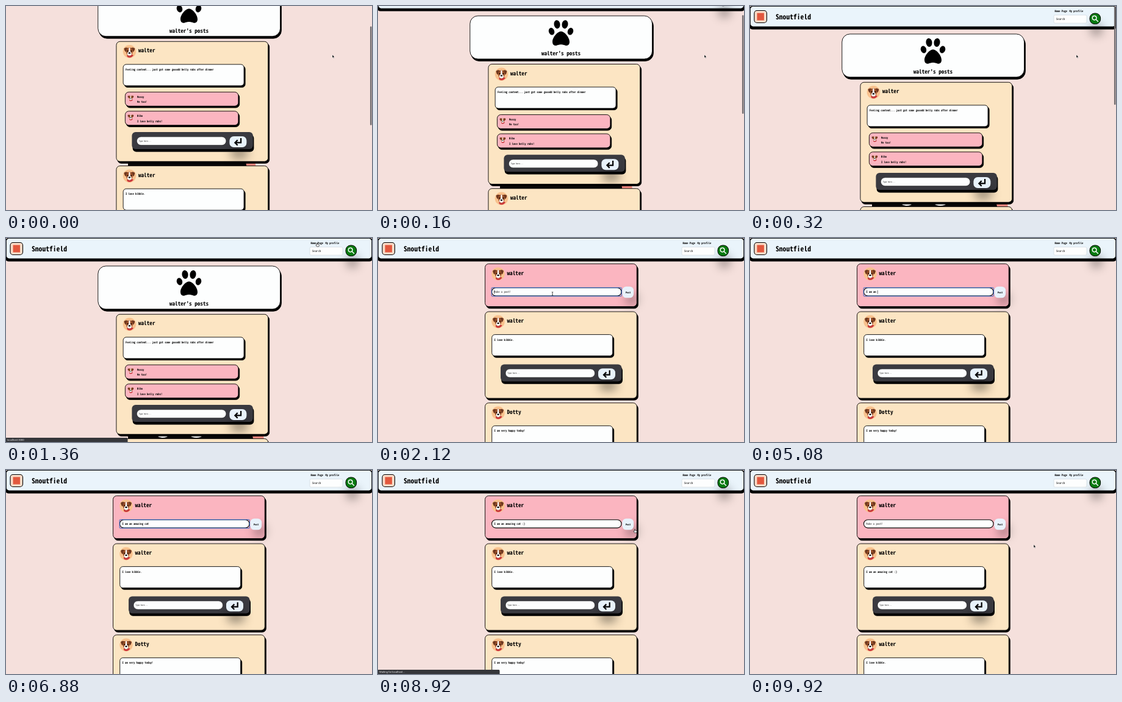
An HTML page for the animation above (10 s loop, 600 by 335 pixels).

```html
<!DOCTYPE html>
<html lang="en">
<head>
<meta charset="utf-8">
<style>
  html, body { margin: 0; width: 100%; height: 100%; overflow: hidden; background: #f5e0dc; }
  svg { display: block; width: 600px; height: 335px; }
  text {
    font: 700 4.6px "Noto Sans Mono CJK JP", "Noto Sans Mono", monospace;
    font-size-adjust: ch-width 0.5;
    text-rendering: geometricPrecision;
    white-space: pre;
  }
  #status text { font: 4.2px Roboto, sans-serif; font-size-adjust: none; }
  .soft { filter: drop-shadow(6px 11px 8px #0005); }
  .glow { filter: drop-shadow(2px 18px 8px #0006); }
</style>
</head>
<body>
<svg id="stage" viewBox="0 0 600 335"></svg>
<script>
const PINK = '#fbb5c0', CREAM = '#fce5c3', ICE = '#e8f2fb', WHITE = '#fdfefe', HINT = '#666';
const USER = 'walter', MESSAGE = 'I am an amazing cat :)';

const rect = (x, y, w, h, r, fill, extra = '') =>
  `<rect x="${x}" y="${y}" width="${w}" height="${h}" rx="${r}" fill="${fill}" ${extra}/>`;
const text = (x, y, str, size = 4.6, fill = '#000', extra = '') =>
  `<text x="${x}" y="${y}" fill="${fill}" style="font-size:${size}px" ${extra}>${str}</text>`;
const group = (x, y, body) => `<g transform="translate(${x} ${y})">${body}</g>`;
const outline = (w = .9) => `stroke="#000" stroke-width="${w}"`;

// Outlined box with a hard black shadow
const box = (x, y, w, h, r, fill, dx = 2, dy = 3) =>
  rect(x + dx, y + dy, w, h, r, '#000', outline()) + rect(x, y, w, h, r, fill, outline());

const dog = `
  <path d="M-4 5Q0 10 4 5L6.5 6Q4 10 0 10Q-3 10-4 8Z" fill="#c9303a"/>
  <path d="M-2-5.5Q-6-8-9-5Q-8.5-1-6 1L-4.5-1ZM2-5.5Q6-8 9-5Q8.5-1 6 1L4.5-1Z" fill="#6e371f"/>
  <path d="M0-6.5Q5-6.5 5.5-1Q5.5 3 3 6Q0 8.5-3 6Q-5.5 3-5.5-1Q-5-6.5 0-6.5Z" fill="#9a5029"/>
  <path d="M-1-6.3H1L1.3 0Q4 2 3.4 5Q0 8.5-3.4 5Q-4 2-1.3 0Z" fill="#fff"/>
  <circle cx="-2.9" cy="-.8" r=".9"/><circle cx="2.9" cy="-.8" r=".9"/>
  <ellipse cy="2.4" rx="1.7" ry="1.2"/>`;
const avatar = (x, y) => group(x, y, `<circle r="10.7" fill="#f8c18d"/>${dog}`);

const heading = name => avatar(21.5, 16.5) + text(36, 18.2, name, 9.2);

const commentForm = y => group(25.5, y,
  rect(1.2, 4, 198.8, 28.3, 6, '#000') +
  rect(0, 0, 198.5, 28, 6, '#3a3a40') +
  rect(8, 7.7, 146.5, 13.8, 7, WHITE, 'stroke="#111" stroke-width=".5"') +
  text(11.3, 15.8, 'Type here...', 3.4, HINT) +
  rect(160, 6.9, 28, 18, 7, ICE, 'class="glow"') +
  '<path d="M178.7 9.8V17.3H169.5M173.3 13L169 17.3L173.3 21.6" fill="none" stroke="#000" stroke-width="2.2"/>');

const comment = (y, name, line) =>
  box(14.5, y, 185.5, 23, 6, PINK, 1.8, 2.7) +
  group(23.5, y + 9.5, `<g transform="scale(.55)">${dog}</g>`) +
  text(34, y + 9.4, name) + text(34, y + 17.9, line);

function post(x, y, name, line, comments = []) {
  return group(x, y,
    box(0, 0, 248.8, comments.length ? 197 : 142.2, 6, CREAM) +
    heading(name) +
    box(11.2, 37.6, 198, 35, 5, WHITE, 2, 2.6) +
    text(15, 47.7, line) +
    comments.map((c, i) => comment(83 + i * 31.4, ...c)).join('') +
    commentForm(86.4 + comments.length * 31.2));
}

const paw = `
  <ellipse cx="-15.5" cy="-3" rx="4.6" ry="6" transform="rotate(-18 -15.5 -3)"/>
  <ellipse cx="-6.5" cy="-14.5" rx="5" ry="7" transform="rotate(-8 -6.5 -14.5)"/>
  <ellipse cx="6.5" cy="-14.5" rx="5" ry="7" transform="rotate(8 6.5 -14.5)"/>
  <ellipse cx="15.5" cy="-3" rx="4.6" ry="6" transform="rotate(18 15.5 -3)"/>
  <path d="M0-3C6-3 14 7 14 14C14 19 11 21 7 20C2 18-2 18-7 20C-11 21-14 19-14 14C-14 7-6-3 0-3Z"/>`;

const header =
  rect(-2, 0, 604, 38.4, 6, '#000') +
  rect(.4, .4, 599.2, 33.6, 5, '#eaf4fb', outline()) +
  rect(7, 7.5, 20.5, 20, 4.5, '#fbdcc8', outline(1.1)) +
  rect(11.5, 11.5, 11.5, 12, 0, '#e2583e') +
  text(42, 22, 'Snoutfield', 11.6) +
  text(499.5, 9.6, 'Home Page', 4.55) + text(523.5, 9.6, 'My profile', 4.55) +
  rect(498, 14.9, 54, 13.3, 2, WHITE, 'stroke="#ccd3da" stroke-width=".6"') +
  text(502, 23.2, 'Search', 4.7, '#555') +
  group(565.8, 20.8,
    rect(-8.8, -8.8, 17.6, 17.6, 8, '#087a10', outline(1) + ' class="glow"') +
    '<g fill="none" stroke="#fff" stroke-width="1.5"><circle cx="-1.2" cy="-1.2" r="3.3"/><path d="M1.2 1.2L5 5"/></g>');

const profile =
  box(150.8, 46, 298.8, 70.8, 13, WHITE, 1.8, 3.4) +
  group(300, 74.5, paw) +
  text(300, 110.5, USER + "'s posts", 9.15, '#000', 'text-anchor="middle"') +
  post(180.9, 125.3, USER, 'Feeling content... just got some gooodd belly rubs after dinner',
    [['Mossy', 'Me too!'], ['Bibo', 'I love belly rubs!']]) +
  post(180.9, 329.6, USER, 'I love kibble.');

const backdrop = '<path d="M200 255H394L406 335H200Z" fill="#0a0808"/>' +
  '<path d="M393 255H408L424 335H406Z" fill="#ee857c"/>' +
  '<ellipse cx="257" cy="325" rx="8" ry="3" fill="#fff"/><ellipse cx="312" cy="325" rx="9" ry="3" fill="#fff"/>';

const composer = group(175.5, 42.4,
  box(0, 0, 248.8, 70.2, 6, PINK) + heading(USER) +
  rect(11, 39.4, 212.5, 13.3, 6.6, WHITE, outline(1.1)) +
  rect(225, 37.3, 18.6, 18.6, 6.5, ICE, 'class="soft"') +
  text(230.5, 48.2, 'Post', 4.1));

const feed = (first, second) => post(175.5, 121, ...first) + post(175.5, 270.8, ...second);
const kibble = [USER, 'I love kibble.'];

document.getElementById('stage').innerHTML =
  `<g id="profile">${backdrop}<g id="scroller">${profile}</g></g>
  <g id="home">
    <g id="before">${feed(kibble, ['Dotty', 'I am very happy today!'])}</g>
    <g id="after">${feed([USER, MESSAGE], kibble)}</g>
    ${composer}
    ${rect(186.2, 81.6, 213.2, 13.9, 1, 'none', 'id="focus" stroke="#1c62c8" stroke-width=".9"')}
    ${text(190.3, 90.4, 'Make a post!', 4.6, HINT, 'id="hint"')}
    ${text(190.5, 90.4, '', 4.6, '#000', 'id="typed"')}
    ${rect(0, 86, .6, 5.6, 0, '#000', 'id="caret"')}
  </g>
  <g id="header">${header}</g>
  ${rect(596.9, 0, 2.6, 162.2, 1.3, '#757072', 'id="thumb"')}
  <g id="status"><path d="M0 328H198Q199.5 328 199.5 330V335H0Z" fill="#35363a"/>
    <text id="address" x="2" y="333" fill="#e8eaed"></text></g>
  <g id="pointer">
    <path id="arrow" d="M0 0V5.2L1.2 4.1L2 6L2.9 5.6L2.1 3.8H3.7Z" stroke="#fff" stroke-width=".5"/>
    <path id="hand" d="M-.6.4Q0-.5.6.4V2.2L3 2.8Q3.6 3 3.4 4L2.8 6H-.6L-2.2 3.4Q-1.8 2.7-.6 3.6Z" fill="#fff" stroke="#000" stroke-width=".6"/>
    <path id="beam" d="M-1.2-2.8Q0-2.8 0-2Q0-2.8 1.2-2.8M0-2V2M-1.2 2.8Q0 2.8 0 2Q0 2.8 1.2 2.8" fill="none" stroke="#000" stroke-width=".7"/>
  </g>`;

const el = Object.fromEntries([...document.querySelectorAll('[id]')].map(e => [e.id, e]));
const show = (id, on) => el[id].style.display = on ? '' : 'none';
const move = (id, x, y) => el[id].setAttribute('transform', `translate(${x} ${y})`);
const progress = (t, a, b) => Math.min(1, Math.max(0, (t - a) / (b - a)));
const smooth = p => p * p * (3 - 2 * p);

const HOME_AT = 1400, FOCUS_AT = 2000, SUBMIT_AT = 8600, POSTED_AT = 9200;

// start, end, target x, target y
const moves = [[500, 1080, 510, 8], [1420, 1940, 286, 91.5], [7850, 8450, 421, 97], [9150, 9650, 465, 122.5]];

function pointerAt(t) {
  let x = 535, y = 80;
  for (const [a, b, tx, ty] of moves) {
    const p = smooth(progress(t, a, b));
    x += (tx - x) * p;
    y += (ty - y) * p;
  }
  return [x, y];
}

// Bursts of typing: start, end, number of keys
const bursts = [[2700, 5000, 8], [5080, 6340, 11], [7000, 7600, 3]];

function typing(t) {
  let count = 0, lastKey = FOCUS_AT;
  for (const [a, b, keys] of bursts) {
    const done = Math.floor(progress(t, a, b) * keys);
    count += done;
    if (done) lastKey = a + (b - a) * done / keys;
  }
  return { count, lastKey };
}

function draw(t) {
  const atHome = t >= HOME_AT, posted = t >= POSTED_AT;
  const scroll = 67 * (1 - smooth(progress(t, 0, 300)));
  show('profile', !atHome);
  show('home', atHome);
  show('before', !posted);
  show('after', posted);
  move('scroller', 0, -scroll);
  move('header', 0, -scroll);
  move('thumb', 0, scroll / 2);
  el.thumb.style.opacity = atHome ? 0 : 1 - progress(t, 1000, 1250);

  const { count, lastKey } = typing(t);
  const focused = t >= FOCUS_AT && t < SUBMIT_AT;
  show('focus', focused);
  show('hint', posted || count === 0);
  el.typed.textContent = posted ? '' : MESSAGE.slice(0, count);
  show('caret', focused && (t - lastKey) % 1000 < 500);
  el.caret.setAttribute('x', 190.4 + count * 2.3);

  const [x, y] = pointerAt(t);
  const overInput = atHome && x > 187 && x < 399 && y > 82 && y < 96;
  const overLink = y < 12 && x < 520;
  const overButton = x > 401 && x < 422 && y < 99 && t > FOCUS_AT;
  const waiting = t >= SUBMIT_AT + 120 && !posted;
  show('status', overLink || waiting);
  el.address.textContent = waiting ? 'Waiting for localhost...' : 'localhost:3000';
  move('pointer', x, y);
  show('pointer', count === 0 || t > moves[2][0]);
  show('beam', overInput);
  show('hand', overLink || overButton);
  show('arrow', !overInput && !overLink && !overButton);
}

const start = performance.now();
function tick() {
  draw((performance.now() - start) % 10000);
  requestAnimationFrame(tick);
}
tick();
</script>
</body>
</html>
```
